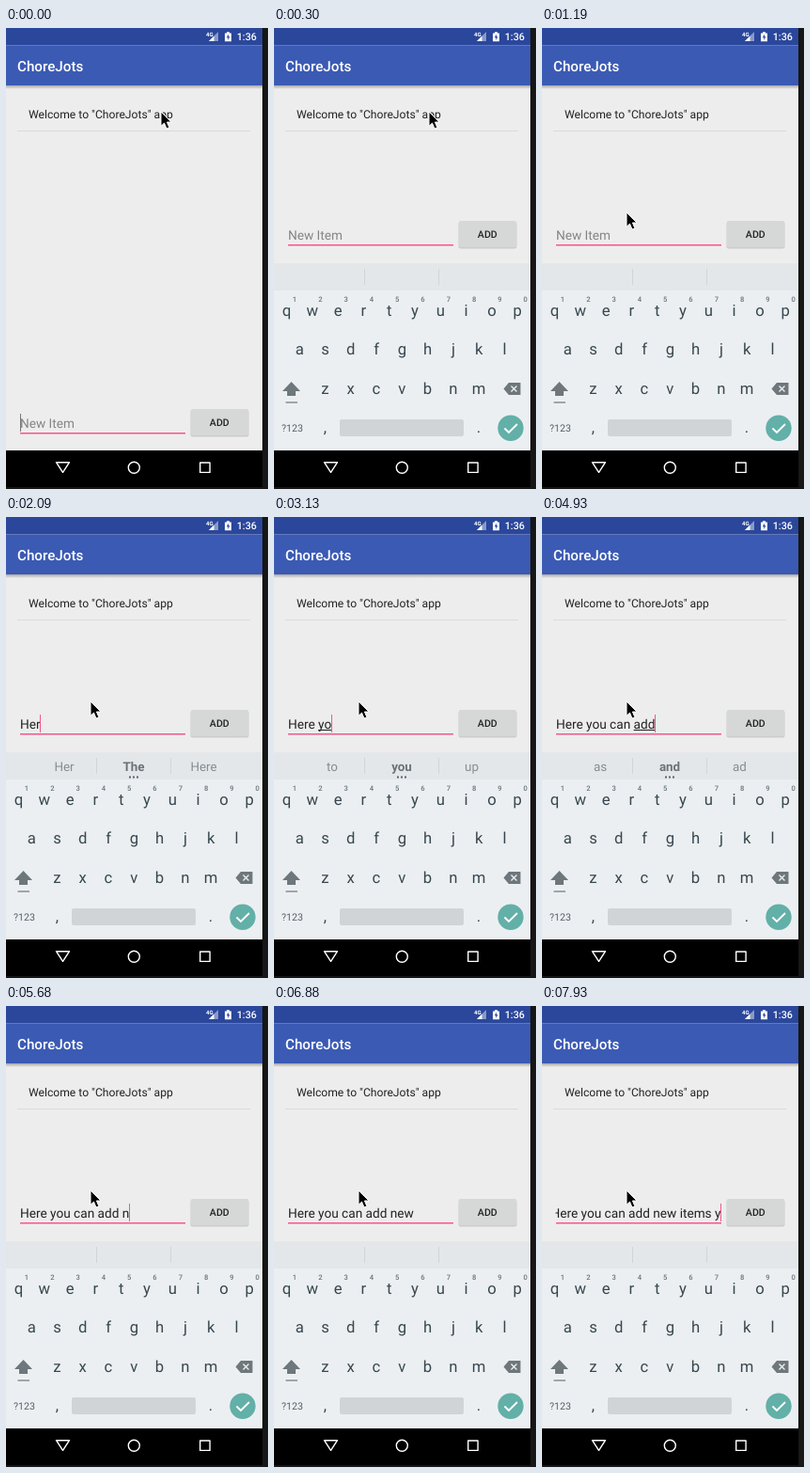
Animation, 279 px wide and 490 px high, one loop 8 s. Source, as an HTML page:

```html
<!DOCTYPE html>
<html lang="en">
<head>
<meta charset="utf-8">
<title>Task list</title>
<style>
html, body { margin: 0; width: 100%; height: 100%; overflow: hidden; background: #161616; }
svg { display: block; width: 100vw; height: 100vh; font-family: Roboto, sans-serif; text-rendering: geometricPrecision; }
text { white-space: pre; }
.key { font-size: 16.7px; fill: #37474f; text-anchor: middle; }
.digit { font-size: 7.6px; font-weight: 500; fill: #67757c; text-anchor: middle; }
.hint { font-size: 13.4px; fill: #858d91; text-anchor: middle; }
.mid { font-weight: 700; fill: #6b7377; }
</style>
</head>
<body>
<svg viewBox="0 0 279 490">
  <defs>
    <linearGradient id="shade" x1="0" y1="0" x2="0" y2="1">
      <stop offset="0" stop-color="#000" stop-opacity=".3"/>
      <stop offset="1" stop-color="#000" stop-opacity="0"/>
    </linearGradient>
    <clipPath id="fieldClip"><rect x="14.5" y="205" width="177" height="30"/></clipPath>
    <clipPath id="pageClip"><rect width="273" height="449"/></clipPath>
  </defs>
  <rect width="279" height="490" fill="#161616"/>
  <rect width="273" height="449" fill="#ededed"/>

  <rect width="273" height="18.5" fill="#2b479b"/>
  <rect y="18.5" width="273" height="42.5" fill="#3b5ab4"/>
  <rect y="61" width="273" height="4" fill="url(#shade)"/>
  <g fill="#fff">
    <text x="213" y="8.5" font-size="6" font-weight="700">4G</text>
    <path d="M226 4V14H216Z" fill-opacity=".45"/>
    <path d="M221.500 8.500V14H216Z"/>
    <path d="M233 5.500H235V4.300H238V5.500H240V14.300H233Z"/>
    <path d="M237 6.500L234.800 10.300H236.300V13L238.400 9.200H237Z" fill="#2b479b"/>
    <text x="245.700" y="13" font-size="10.8" font-weight="500">1:36</text>
    <text x="12" y="45.500" font-size="15.2" font-weight="500">ChoreJots</text>
  </g>
  <text x="24" y="96" font-size="12.13" fill="#222">Welcome to "ChoreJots" app</text>
  <path d="M12 109.500H260" stroke="#dadada"/>

  <g id="form">
    <g clip-path="url(#fieldClip)">
      <text id="entry" y="224.700" font-size="13.65"></text>
      <path id="compose" stroke="#222" stroke-width="1"/>
      <rect id="caret" y="210" width="1" height="19"/>
    </g>
    <path d="M15 230.700H191" stroke="#f5578b" stroke-width="1.5"/>
    <rect x="196.500" y="206" width="62" height="28.500" rx="2" fill="#000" opacity=".14"/>
    <rect x="197" y="205" width="61" height="28" rx="1.500" fill="#d6d7d7"/>
    <text x="227.300" y="222.900" font-size="10.6" font-weight="500" text-anchor="middle" fill="#222">ADD</text>
  </g>

  <g clip-path="url(#pageClip)">
    <g id="board">
      <rect y="250" width="273" height="199" fill="#eceff1"/>
      <rect y="250" width="273" height="29" fill="#e4e7e9"/>
      <path d="M96.500 256V273M175.500 256V273" stroke="#d0d5d7"/>
      <g id="hints">
        <text class="hint" x="62" y="270"></text>
        <text class="hint mid" x="136" y="270"></text>
        <text class="hint" x="210.500" y="270"></text>
        <path d="M131 276.500h2m2 0h2m2 0h2" stroke="#59636a" stroke-width="2"/>
      </g>
      <g id="keys"></g>
      <path d="M18.500 376L28 386H23V391H14V386H9Z" fill="#6d777c"/>
      <path d="M12.500 398H25" stroke="#7d878b" stroke-width="1.4"/>
      <path d="M244.500 383.500L250 377H262.500V390H250Z" fill="#6d777c"/>
      <path d="M252.500 380.500l6 6m0-6l-6 6" stroke="#eceff1" stroke-width="1.4"/>
      <text x="8" y="429" font-size="10.6" fill="#52616a">?123</text>
      <rect x="70" y="416" width="132" height="18" rx="2" fill="#d0d4d7"/>
      <circle cx="252" cy="425.300" r="13.700" fill="#62b0a8"/>
      <path d="M245.500 425.500l4.500 4.500l9-9" fill="none" stroke="#fff" stroke-width="1.900"/>
    </g>
  </g>

  <rect y="449" width="273" height="39" fill="#000"/>
  <g fill="none" stroke="#fff" stroke-width="1.4" stroke-linejoin="round">
    <path d="M53.500 461.700H67.500L60.500 472.300Z"/>
    <circle cx="136.300" cy="467.300" r="6"/>
    <rect x="206.700" y="462" width="10.400" height="10.400"/>
  </g>
  <path id="pointer" d="M0 0V15.300L3.500 12.100L6 18L8.900 16.800L6.400 11H11Z" fill="#000" stroke="#fff" stroke-width="1"/>
</svg>
<script>
const LOOP = 8000, TICK = 150, BLINK = 500, LEFT = 15, RIGHT = 191;
const $ = id => document.getElementById(id);
const entry = $('entry'), compose = $('compose'), caret = $('caret');
const hints = $('hints'), hintTexts = hints.querySelectorAll('text');

// time, text, suggestions, underlined word
const STEPS = [
  [0, '', ''],
  [1640, 'H', ''],
  [1790, 'He', ''],
  [1940, 'He', 'He The Her'],
  [2090, 'Her', 'Her The Here'],
  [2240, 'Here', 'Her The Here'],
  [2390, 'Here', "Hero Here Here's", 1],
  [2690, 'Here ', ''],
  [2840, 'Here y', ''],
  [2990, 'Here yo', 'to you up', 1],
  [3140, 'Here you', 'to you up', 1],
  [3290, 'Here you', 'your you young', 1],
  [3590, 'Here you ', ''],
  [3730, 'Here you c', ''],
  [3880, 'Here you c', 'c can d', 1],
  [4030, 'Here you ca', "van can't fan", 1],
  [4180, 'Here you can', "van can't fan", 1],
  [4330, 'Here you can', "can't can van", 1],
  [4480, 'Here you can ', ''],
  [4630, 'Here you can a', ''],
  [4780, 'Here you can ad', 'as and ad', 1],
  [4930, 'Here you can add', 'as and ad', 1],
  [5080, 'Here you can add ', 'added add adds'],
  [5380, 'Here you can add ', ''],
  [5680, 'Here you can add n', ''],
  [5830, 'Here you can add ne', 'me need new', 1],
  [5980, 'Here you can add new', 'me need new', 1],
  [6130, 'Here you can add new', 'news new knew', 1],
  [6280, 'Here you can add new ', 'news new knew'],
  [6430, 'Here you can add new ', ''],
  [7030, 'Here you can add new i', ''],
  [7180, 'Here you can add new it', 'it is in', 1],
  [7330, 'Here you can add new ite', 'item it items', 1],
  [7480, 'Here you can add new item', 'item it items', 1],
  [7630, 'Here you can add new items', 'item items its', 1],
  [7780, 'Here you can add new items ', ''],
  [7930, 'Here you can add new items y', '']
];

function addKey(char, x, y, cls = 'key') {
  const el = document.createElementNS('http://www.w3.org/2000/svg', 'text');
  el.setAttribute('class', cls);
  el.setAttribute('x', x);
  el.setAttribute('y', y);
  el.textContent = char;
  $('keys').append(el);
}

function addRow(chars, x, y) {
  [...chars].forEach((char, i) => addKey(char, x + i * 27.3, y));
}

addRow('qwertyuiop', 13.5, 305.8);
addRow('asdfghjkl', 27.2, 347.4);
addRow('zxcvbnm', 54.3, 389);
addKey(',', 54.5, 430.3);
addKey('.', 218, 430.3);
[...'1234567890'].forEach((d, i) => addKey(d, 22 + i * 27.3, 291, 'digit'));

const widths = {};
function widthOf(text) {
  if (!(text in widths)) {
    // a closing bar keeps trailing spaces measurable
    entry.textContent = text + '|';
    const full = entry.getComputedTextLength();
    entry.textContent = '|';
    widths[text] = full - entry.getComputedTextLength();
  }
  return widths[text];
}

function snap(t) {
  const start = t < 890 ? 0 : t < 3730 ? 890 : 3730;
  return start + Math.floor((t - start) / TICK) * TICK;
}

const clamp = v => Math.max(0, Math.min(1, v));
const ease = v => v * v * (3 - 2 * v);

function caretOn(t, text) {
  if (!text) return t < 150 || (t >= 690 && t < 1190);
  const typed = STEPS.find(s => s[1] === text)[0];
  return Math.floor((t - typed) / BLINK) % 2 === 0;
}

function drawField(t, text, underlined) {
  const width = widthOf(text);
  const x = LEFT - Math.max(0, LEFT + width - RIGHT + 0.5);
  entry.textContent = text || 'New Item';
  entry.setAttribute('x', x);
  entry.setAttribute('fill', text ? '#222' : '#858585');

  const wordStart = x + widthOf(text.slice(0, text.lastIndexOf(' ') + 1));
  compose.setAttribute('d', underlined ? `M${wordStart} 226.500H${x + width}` : '');

  caret.setAttribute('x', Math.min(RIGHT - 0.7, Math.round(x + width - 0.2)));
  caret.setAttribute('fill', t < 150 ? '#777' : '#f5578b');
  caret.setAttribute('opacity', caretOn(t, text) ? 1 : 0);
}

function drawHints(list) {
  const words = list.split(' ');
  hints.setAttribute('opacity', list ? 1 : 0);
  hintTexts.forEach((el, i) => el.textContent = words[i] || '');
}

function render(time) {
  const t = snap(time);
  const [, text, list, underlined] = STEPS.findLast(s => s[0] <= t);
  drawField(t, text, underlined);
  drawHints(list);

  const open = t < 150 ? 0 : clamp(0.6 + (t - 150) / 375);
  $('form').setAttribute('transform', `translate(0 ${t < 150 ? 200 : 0})`);
  $('board').setAttribute('transform', `translate(0 ${(1 - open) * 100})`);
  $('board').setAttribute('opacity', open);

  const move = ease(clamp((t - 300) / 590));
  $('pointer').setAttribute('transform', `translate(${165 - 75 * move} ${89 + 107 * move})`);
}

function loop() {
  render(performance.now() % LOOP);
  requestAnimationFrame(loop);
}
loop();
</script>
</body>
</html>
```
